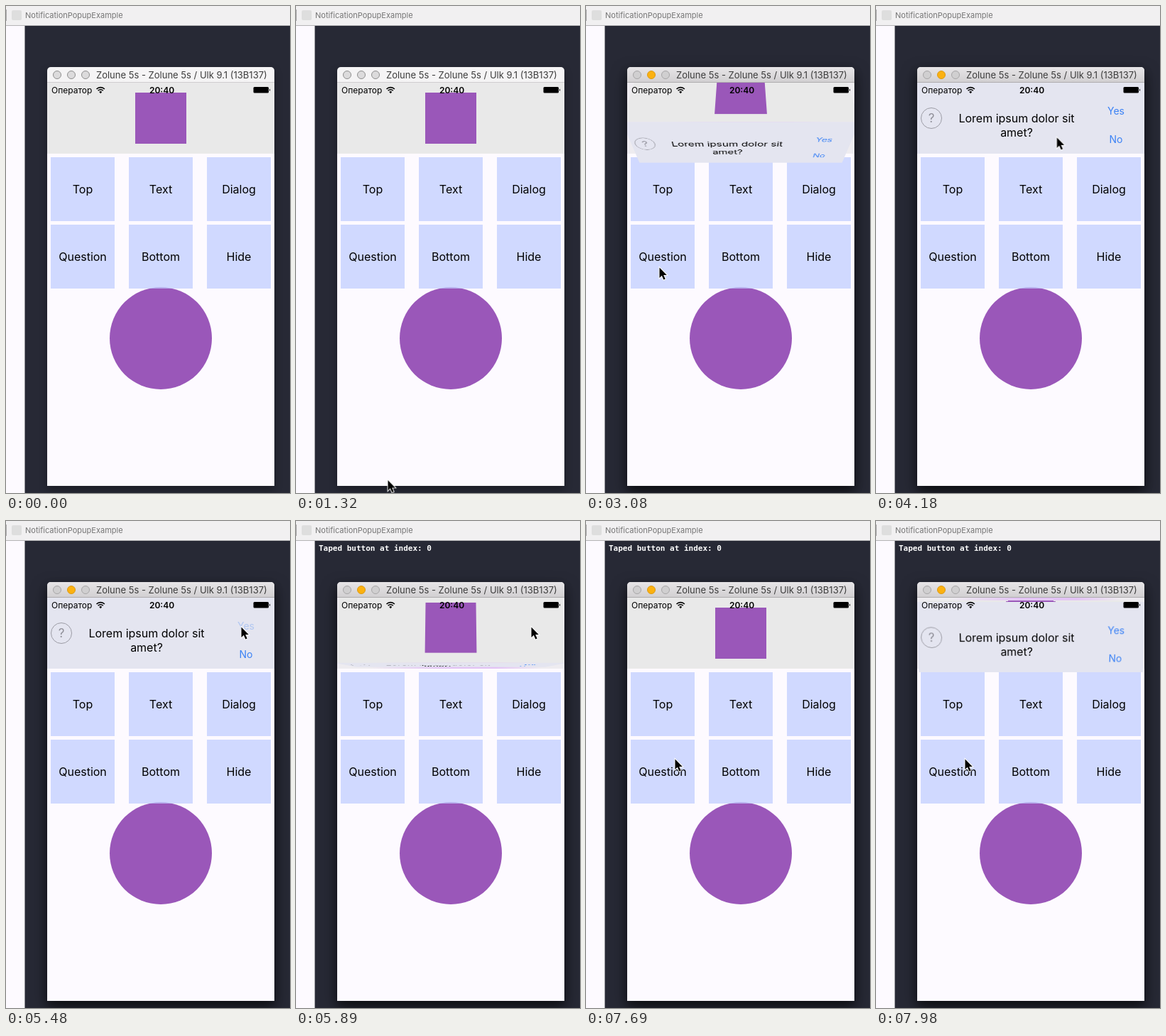
These frames come from a looping animation (400x686 px, 8000 ms). An HTML page:

```html
<!DOCTYPE html>
<html lang="en">
<head>
<meta charset="utf-8">
<title>Notification popup</title>
<style>
html, body { margin: 0; width: 100%; height: 100%; overflow: hidden; background: #272935; }
#stage { position: relative; width: 400px; height: 686px; overflow: hidden; background: #272935; }
#stage > *, #screen > *, .face, .face svg { position: absolute; left: 0; top: 0; }
svg { display: block; overflow: visible; }
text { font-family: Inter, Roboto, sans-serif; }
.shadow { width: 320px; height: 590px; border-radius: 5px 5px 0 0; }
#stage > .shadow { left: 58px; top: 86px; }
#idle { box-shadow: 0 5px 12px rgba(0, 0, 0, .32); }
#active { box-shadow: 0 10px 22px rgba(0, 0, 0, .5); }
#stage > #screen { left: 58px; top: 108px; width: 320px; height: 568px; overflow: hidden; background: #fdfaff; }
#backing {
  width: 320px; height: 100px;
  background: linear-gradient(90deg, #eeecf0 15%, #e3c3f5 45%, #e3c3f5 70%, #eeecf0 90%);
}
#view { width: 320px; height: 100px; perspective: 450px; }
#cube { width: 320px; height: 100px; transform-style: preserve-3d; }
.face { width: 320px; height: 100px; backface-visibility: hidden; }
#home { background: #e9e9e9; transform: translateZ(50px); }
#ask { background: #e4e5f0; transform: rotateX(-90deg) translateZ(50px); }
.mid { text-anchor: middle; }
.mono { font: bold 11px "DejaVu Sans Mono", "Liberation Mono", monospace; }
</style>
</head>
<body>
<div id="stage">
  <div class="shadow" id="idle"></div>
  <div class="shadow" id="active"></div>

  <svg width="400" height="686">
    <rect y="28" width="26" height="658" fill="#fdfaff"/>
    <rect x="26" y="28" width="1" height="658" fill="#8d8c93"/>
    <rect width="400" height="27" fill="#f1f0f1"/>
    <rect y="27" width="400" height="1" fill="#b4b3b5"/>
    <rect y="5" width="1" height="16" fill="#a9a9a9"/>
    <rect x="8" y="6" width="14" height="14" rx="2" fill="#dedede"/>
    <text x="27" y="17" font-size="11" fill="#757575">NotificationPopupExample</text>
    <text id="log" class="mono" x="32" y="42" fill="#fff">Taped button at index: 0</text>
  </svg>

  <svg width="400" height="686">
    <defs>
      <linearGradient id="bar" x2="0" y2="1">
        <stop stop-color="#e7e5e7"/><stop offset="1" stop-color="#d1cfd1"/>
      </linearGradient>
      <path id="cap" d="M58 108V91a5 5 0 0 1 5-5H373a5 5 0 0 1 5 5V108Z"/>
    </defs>
    <use href="#cap" fill="#f5f4f5"/>
    <rect x="58" y="107" width="320" height="1" fill="#cfcdcf"/>
    <g fill="#dcdbdc" stroke="#8f8f8f">
      <circle cx="72" cy="97" r="5.5"/><circle cx="92" cy="97" r="5.5"/><circle cx="112" cy="97" r="5.5"/>
    </g>
    <g id="focus">
      <use href="#cap" fill="url(#bar)"/>
      <rect x="58" y="107" width="320" height="1" fill="#aeacae"/>
      <g fill="#d0cfd0" stroke="#a7a6a7">
        <circle cx="72" cy="97" r="5.5"/><circle cx="112" cy="97" r="5.5"/>
        <circle cx="92" cy="97" r="5.5" fill="#fbb110" stroke="#dd9a12"/>
      </g>
    </g>
    <text x="127" y="102" font-size="13" fill="#3c3c3c">Zolune 5s - Zolune 5s / Ulk 9.1 (13B137)</text>
  </svg>

  <div id="screen">
    <div id="backing"></div>
    <svg id="page" width="320" height="568" viewBox="58 108 320 568">
      <circle cx="218" cy="468" r="72" fill="#9a57b9"/>
    </svg>
    <div id="view">
      <div id="cube">
        <div class="face" id="home">
          <svg width="320" height="100" viewBox="58 108 320 100">
            <rect x="182" y="122" width="72" height="72" fill="#9a57b9"/>
          </svg>
        </div>
        <div class="face" id="ask">
          <svg width="320" height="100" viewBox="58 108 320 100">
            <circle cx="78" cy="158" r="14.5" fill="none" stroke="#9c9ca5"/>
            <g class="mid">
              <text x="78" y="164" font-size="17" fill="#8e8e97">?</text>
              <text x="198" y="164" font-size="16">Lorem ipsum dolor sit</text>
              <text x="198" y="184" font-size="16">amet?</text>
              <g font-size="14" fill="#3b82f5">
                <text id="yes" x="338" y="153.500">Yes</text>
                <text x="338" y="193.500">No</text>
              </g>
            </g>
          </svg>
        </div>
      </div>
    </div>
    <svg width="320" height="100" viewBox="58 108 320 100">
      <text x="64" y="122.500" font-size="12">Оператор</text>
      <g fill="none" stroke="#000" stroke-width="1.600">
        <path d="M127.500 117a8 8 0 0 1 11.400 0M129.600 119.300a5 5 0 0 1 7.200 0"/>
      </g>
      <path d="M133.200 123.200l-2-2.100a2.800 2.800 0 0 1 4 0Z"/>
      <text class="mid" x="219.500" y="122.500" font-size="12" font-weight="600">20:40</text>
      <rect x="348.500" y="114" width="21.500" height="8.500" rx="1.500"/>
      <path d="M371 116.500a2 2 0 0 1 0 3.500Z"/>
    </svg>
  </div>

  <svg id="cursor" width="14" height="20">
    <path d="M.5 .5V15L3.800 11.800 6.300 17.600 8.700 16.600 6.200 10.900H10.800Z" stroke="#fff" stroke-width="1.800" paint-order="stroke"/>
  </svg>
</div>

<script>
const LOOP = 8000;
const $ = id => document.getElementById(id);

// Menu tiles
const labels = ["Top", "Text", "Dialog", "Question", "Bottom", "Hide"];
$("page").innerHTML += labels.map((label, i) => {
  const x = 63 + i % 3 * 110, y = 213 + Math.floor(i / 3) * 95;
  return `<rect x="${x}" y="${y}" width="90" height="90" fill="rgba(193,206,255,.73)"/>
    <text class="mid" x="${x + 45}" y="${y + 51}" font-size="16">${label}</text>`;
}).join("");

// Each step: [time in ms, value, easing to the next step]
function play(el, prop, steps, format = v => v) {
  const frames = steps.map(([time, value, easing = "linear"]) =>
    ({ offset: time / LOOP, [prop]: format(value), easing }));
  el.animate(frames, { duration: LOOP, iterations: Infinity });
}

const showFrom = (id, time) =>
  play($(id), "opacity", [[0, 0], [time, 0], [time, 1], [LOOP, 1]]);

showFrom("focus", 2850);
showFrom("active", 2850);
showFrom("log", 5620);

play($("yes"), "opacity", [[0, 1], [5480, 1], [5480, .3], [5620, .3], [5620, 1], [LOOP, 1]]);

// The last turn is cut by the end of the loop
play($("cube"), "transform", [
  [0, 0], [2915, 0, "ease-in-out"], [3265, 90],
  [5620, 90, "ease-in-out"], [5970, 0],
  [7700, 0, "cubic-bezier(.43,0,.628,.803)"], [LOOP, 86.3]
], deg => `translateZ(-50px) rotateX(${deg}deg)`);

play($("cursor"), "transform", [
  [0, [131, 690]], [1260, [131, 690], "cubic-bezier(.3,.2,.4,1)"],
  [2020, [103, 376]], [2070, [103, 376]], [2130, [103, 368]],
  [3780, [103, 368], "cubic-bezier(.4,0,.8,.8)"],
  [4180, [254, 185], "cubic-bezier(.2,.4,.5,1)"],
  [4530, [311, 155]], [4580, [311, 155], "ease-out"], [4880, [331, 149]],
  [6310, [331, 149], "cubic-bezier(.4,0,.8,.8)"],
  [6590, [238, 226], "cubic-bezier(.2,.4,.5,1)"],
  [7100, [126, 334]], [7150, [126, 334]], [7210, [125, 335]],
  [LOOP, [125, 335]]
], ([x, y]) => `translate(${x}px, ${y}px)`);
</script>
</body>
</html>
```
